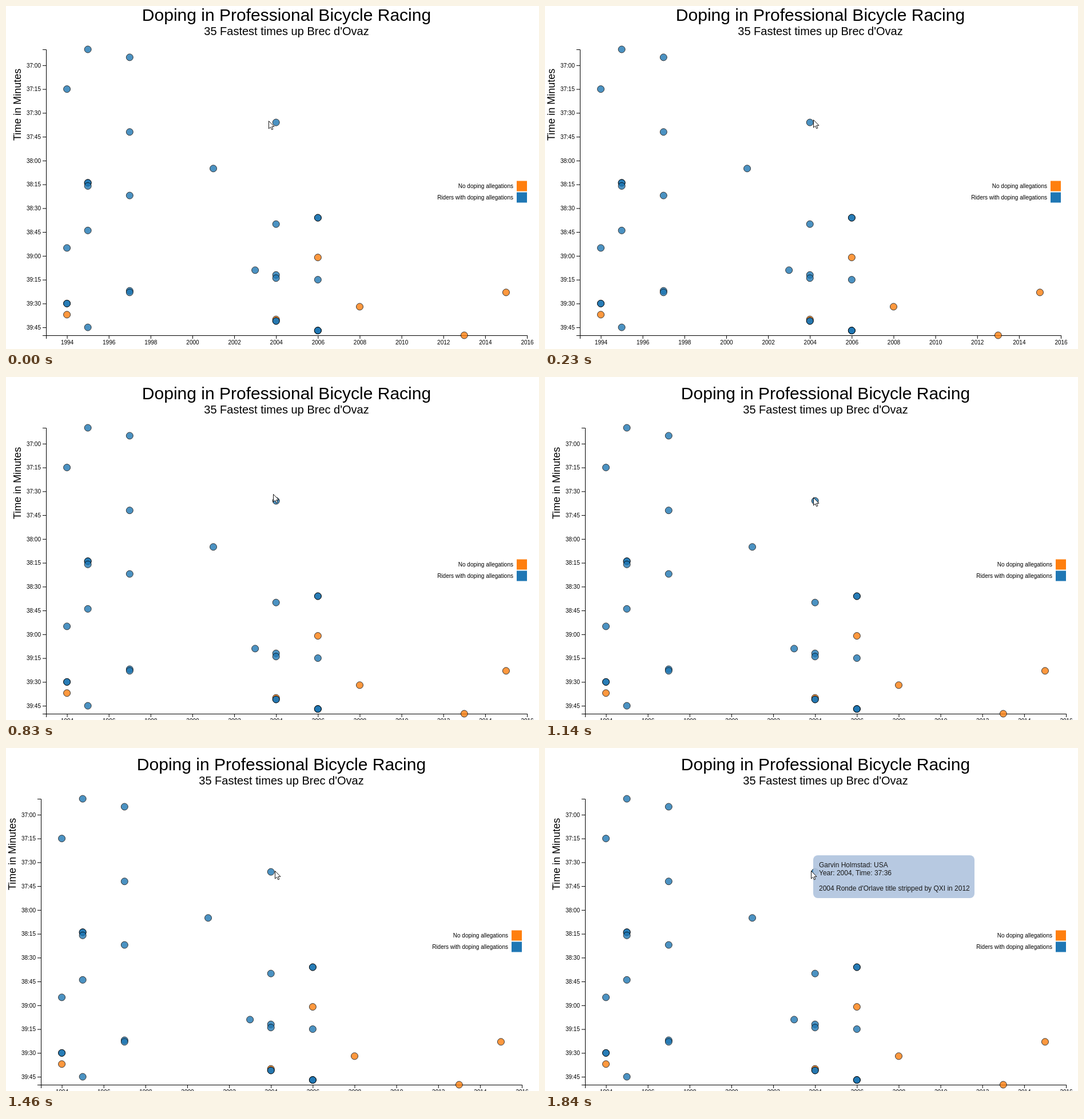
These frames come from a looping animation (932x601 px, 2310 ms). An HTML page:

```html
<!DOCTYPE html>
<html lang="en">
<head>
<meta charset="utf-8">
<title>Scatterplot</title>
<style>
  html, body { margin: 0; width: 100%; height: 100%; overflow: hidden; background: #fff; }
  svg { display: block; font: 10px "Liberation Sans", Arial, sans-serif; }
  .axis { fill: none; stroke: #000; }
  .dot { stroke: #000; opacity: .8; }
  .end { text-anchor: end; }
  .mid { text-anchor: middle; }
</style>
</head>
<body>
<svg id="stage" width="932" height="601" viewBox="0 0 932 601">
  <g id="chart"></g>
  <g id="tip" opacity=".9" font-size="12">
    <rect width="282" height="75" rx="8" fill="#b0c4de"/>
    <text x="10" y="21">Garvin Holmstad: USA</text>
    <text x="10" y="35">Year: 2004, Time: 37:36</text>
    <text x="10" y="62">2004 Ronde d'Orlave title stripped by QXI in 2012</text>
  </g>
  <path id="cursor" d="M.5 .5V14L3.6 11.1L5.8 15.8L7.9 14.8L5.8 10.3H10Z" fill="#fff" stroke="#000" stroke-width=".9"/>
</svg>
<script>
const WIDTH = 841, HEIGHT = 501, LEFT = 70, TOP = 76, LOOP = 2310;
const BLUE = '#1f77b4', ORANGE = '#ff7f0e';
const START = 36 * 60 + 50, SPAN = 180;

// Seconds after START, by year
const doped = {
  1994: [25, 125, 160, 160],
  1995: [0, 84, 84, 86, 114, 175],
  1997: [5, 52, 92, 152, 153],
  2001: [75],
  2003: [139],
  2004: [46, 110, 142, 144, 171, 171],
  2006: [106, 106, 145, 177, 177, 177]
};
const clean = { 1994: [167], 2004: [170], 2006: [131], 2008: [162], 2013: [180], 2015: [153] };

// Cursor glides: from ms, to ms, x, y
const glides = [
  [60, 70, 469, 199],
  [450, 460, 466, 201],
  [600, 1140, 469, 211],
  [1220, 1300, 470, 215],
  [1690, 1840, 465, 215]
];
const SCROLL_AT = 460;
const flips = [150, 460, 1220, 1840];              // scrollbar appears, disappears
const hovers = [[150, 230], [1220, 1290], [1840, LOOP]];

const byId = id => document.getElementById(id);
const chart = byId('chart'), tip = byId('tip'), cursor = byId('cursor');
const xOf = year => (year - 1993) * WIDTH / 23;
const yOf = sec => sec * HEIGHT / SPAN;

function add(tag, attrs, text = '') {
  const el = document.createElementNS('http://www.w3.org/2000/svg', tag);
  for (const key in attrs) el.setAttribute(key, attrs[key]);
  el.textContent = text;
  chart.append(el);
}
const line = d => add('path', { class: 'axis', d });

function drawAxes() {
  line(`M.5 ${HEIGHT + 6}v-5.5H${WIDTH + .5}v5.5`);
  line(`M-6 .5H.5V${HEIGHT + .5}H-6`);
  for (let year = 1994; year <= 2016; year += 2) {
    const x = xOf(year) + .5;
    line(`M${x} ${HEIGHT}v6`);
    add('text', { class: 'mid', x, y: HEIGHT + 9, dy: '.71em' }, year);
  }
  for (let sec = 10; sec < SPAN; sec += 15) {
    const y = yOf(sec) + .5, time = START + sec;
    line(`M-6 ${y}h6`);
    const label = Math.floor(time / 60) + ':' + String(time % 60).padStart(2, '0');
    add('text', { class: 'end', x: -9, y, dy: '.32em' }, label);
  }
}

function drawDots(data, fill) {
  for (const year in data)
    for (const sec of data[year])
      add('circle', { class: 'dot', cx: xOf(year), cy: yOf(sec), r: 6, fill });
}

function drawLegend(label, fill, y) {
  add('rect', { x: WIDTH - 18, y, width: 18, height: 18, fill });
  add('text', { class: 'end', x: WIDTH - 24, y: y + 9, dy: '.35em' }, label);
}

drawAxes();
add('text', { class: 'mid', x: WIDTH / 2, y: -50, 'font-size': 30 }, 'Doping in Professional Bicycle Racing');
add('text', { class: 'mid', x: WIDTH / 2, y: -25, 'font-size': 20 }, "35 Fastest times up Brec d'Ovaz");
add('text', { transform: 'rotate(-90)', x: -160, y: -44, 'font-size': 18 }, 'Time in Minutes');
drawDots(clean, ORANGE);
drawDots(doped, BLUE);
drawLegend('No doping allegations', ORANGE, HEIGHT / 2 - 20);
drawLegend('Riders with doping allegations', BLUE, HEIGHT / 2);

const place = (el, x, y) => el.setAttribute('transform', `translate(${x} ${y})`);

function cursorAt(t) {
  let x = 459, y = 201;
  for (const [from, to, toX, toY] of glides) {
    const p = Math.min(1, Math.max(0, (t - from) / (to - from)));
    x += (toX - x) * p;
    y += (toY - y) * p;
  }
  return [Math.round(x), Math.round(y)];
}

function render() {
  const t = performance.now() % LOOP;
  const [x, y] = cursorAt(t);
  const shifted = flips.filter(at => t >= at).length % 2;
  const hovered = hovers.some(([from, to]) => t >= from && t < to);
  place(chart, LEFT - 9 * shifted, TOP + (t >= SCROLL_AT ? 13 : 0));
  place(cursor, x, y);
  place(tip, 469, y - 27);
  tip.setAttribute('visibility', hovered ? 'visible' : 'hidden');
  requestAnimationFrame(render);
}
render();
</script>
</body>
</html>
```
